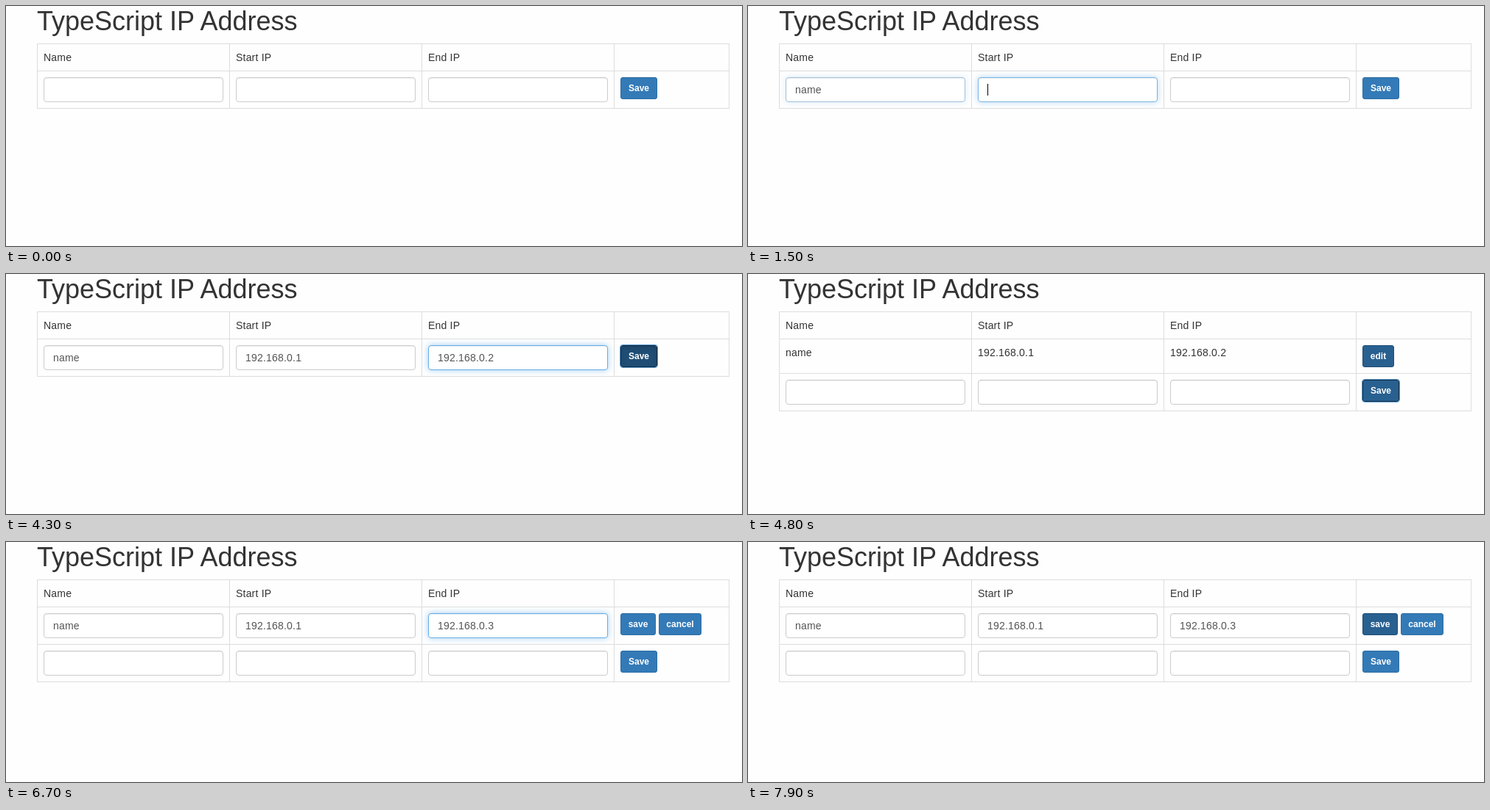
Write an HTML page that moves like this. It is 999 by 327 pixels and loops after 8 s.

```html
<!DOCTYPE html>
<html lang="en">
<head>
<meta charset="utf-8">
<title>TypeScript IP Address</title>
<style>
  html, body { margin: 0; width: 100%; height: 100%; overflow: hidden; background: #fefefe; }
  body { position: relative; font: 14px/20px "Liberation Sans", Arial, sans-serif; color: #333; }
  h1 { position: absolute; left: 42px; top: 1.4px; margin: 0; font-size: 36px; font-weight: 400; line-height: 1.1; white-space: nowrap; }
  #grid { position: absolute; left: 42px; top: 51px; display: grid; grid-template-columns: 261px 261px 261px 156px;
    border: solid #ddd; border-width: 1px 0 0 1px; letter-spacing: .2px; }
  .cell { box-sizing: border-box; padding: 8px; border: solid #ddd; border-width: 0 1px 1px 0; }
  .input { box-sizing: border-box; height: 34px; padding: 0 12px; display: flex; align-items: center;
    border: 1px solid; border-radius: 4px; background: #fff; color: #555; }
  .input i { width: 1px; height: 16px; background: #000; }
  .btn { box-sizing: border-box; float: left; height: 30px; margin-right: 4px; padding: 5px 0; text-align: center;
    font: bold 12px/18px "Liberation Sans", Arial, sans-serif; letter-spacing: 0; color: #fff;
    background: #337ab7; border: 1px solid #2e6da4; border-radius: 3px; }
  .hover { background: #286090; border-color: #204d74; }
  .focus { background: #286090; border-color: #122b40; outline: 1px solid #5e9ed6; }
  .press { background: #204d74; border-color: #122b40; outline: 1px solid #5e9ed6; box-shadow: inset 0 3px 5px rgba(0,0,0,.125); }
</style>
</head>
<body>
<h1>TypeScript IP Address</h1>
<div id="grid"></div>
<script>
const LOOP = 8000;
const WIDTH = { Save: 50, save: 48, cancel: 58, edit: 43 };
const IP = '192.168.0.';
const start = {
  mode: 'new', name: '', from: '', to: '',
  glow: [0, 0, 0],           // focus strength of each field
  caret: -1,                 // field that shows the caret
  Save: '', save: '', cancel: '', edit: ''
};

// Each step changes part of the state from its time on.
const steps = [
  [400, { glow: [.6, 0, 0], caret: 0 }],
  [500, { glow: [1, 0, 0] }],
  [800, { caret: -1 }],
  [1000, { name: 'na', caret: 0 }],
  [1100, { name: 'nam' }],
  [1200, { name: 'name' }],
  [1500, { glow: [.4, .8, 0], caret: 1 }],
  [1600, { glow: [0, 1, 0] }],
  [1800, { from: IP + 1 }],
  [2300, { caret: -1 }],
  [2600, { glow: [0, .4, .7], caret: 2 }],
  [2700, { glow: [0, 0, 1] }],
  [2800, { to: IP + 1 }],
  [3200, { to: IP }],
  [3400, { to: IP + 2 }],
  [3900, { caret: -1 }],
  [4100, { Save: 'hover' }],
  [4300, { Save: 'press' }],
  [4400, { mode: 'view', glow: [0, 0, 0], Save: 'focus' }],
  [4800, { edit: 'hover' }],
  [5100, { edit: 'press', Save: '' }],
  [5200, { mode: 'edit', edit: '', save: 'hover' }],
  [5300, { save: '' }],
  [5500, { glow: [0, 0, .7], caret: 2 }],
  [5600, { glow: [0, 0, 1] }],
  [6000, { caret: -1 }],
  [6100, { to: IP, caret: 2 }],
  [6200, { to: IP + 3 }],
  [6700, { caret: -1 }],
  [6800, { cancel: 'hover' }],
  [6900, { cancel: '', save: 'hover' }],
  [7100, { save: 'press', glow: [0, 0, .6] }],
  [7200, { mode: 'view', save: '', glow: [0, 0, 0] }],
  [7700, { edit: 'hover' }],
  [7900, { mode: 'edit', edit: '', save: 'hover' }]
];

const mix = (a, b, k) => Math.round(a + (b - a) * k);
const row = cells => cells.map(c => `<div class="cell">${c}</div>`).join('');

function input(text, glow = 0, caret = false) {
  const border = [102, 175, 233].map(c => mix(204, c, glow));
  const shadow = `inset 0 1px 1px rgba(0,0,0,.075), 0 0 8px rgba(102,175,233,${.6 * glow})`;
  return `<div class="input" style="border-color:rgb(${border});box-shadow:${shadow}">` +
    `<span>${text}</span>${caret ? '<i></i>' : ''}</div>`;
}

function view(s) {
  const btn = label => `<div class="btn ${s[label]}" style="width:${WIDTH[label]}px">${label}</div>`;
  const values = [s.name, s.from, s.to];
  const fields = values.map((v, i) => input(v, s.glow[i], s.caret === i));
  const blank = ['', '', ''].map(v => input(v));
  const rows = {
    new: [[...fields, btn('Save')]],
    view: [[...values, btn('edit')], [...blank, btn('Save')]],
    edit: [[...fields, btn('save') + btn('cancel')], [...blank, btn('Save')]]
  };
  return row(['Name', 'Start IP', 'End IP', '']) + rows[s.mode].map(row).join('');
}

const grid = document.getElementById('grid');
const t0 = performance.now();
let shown = -1;

function draw() {
  const t = (performance.now() - t0) % LOOP;
  const past = steps.filter(([at]) => at <= t);
  if (past.length !== shown) {
    shown = past.length;
    grid.innerHTML = view(Object.assign({}, start, ...past.map(p => p[1])));
  }
  requestAnimationFrame(draw);
}
draw();
</script>
</body>
</html>
```
